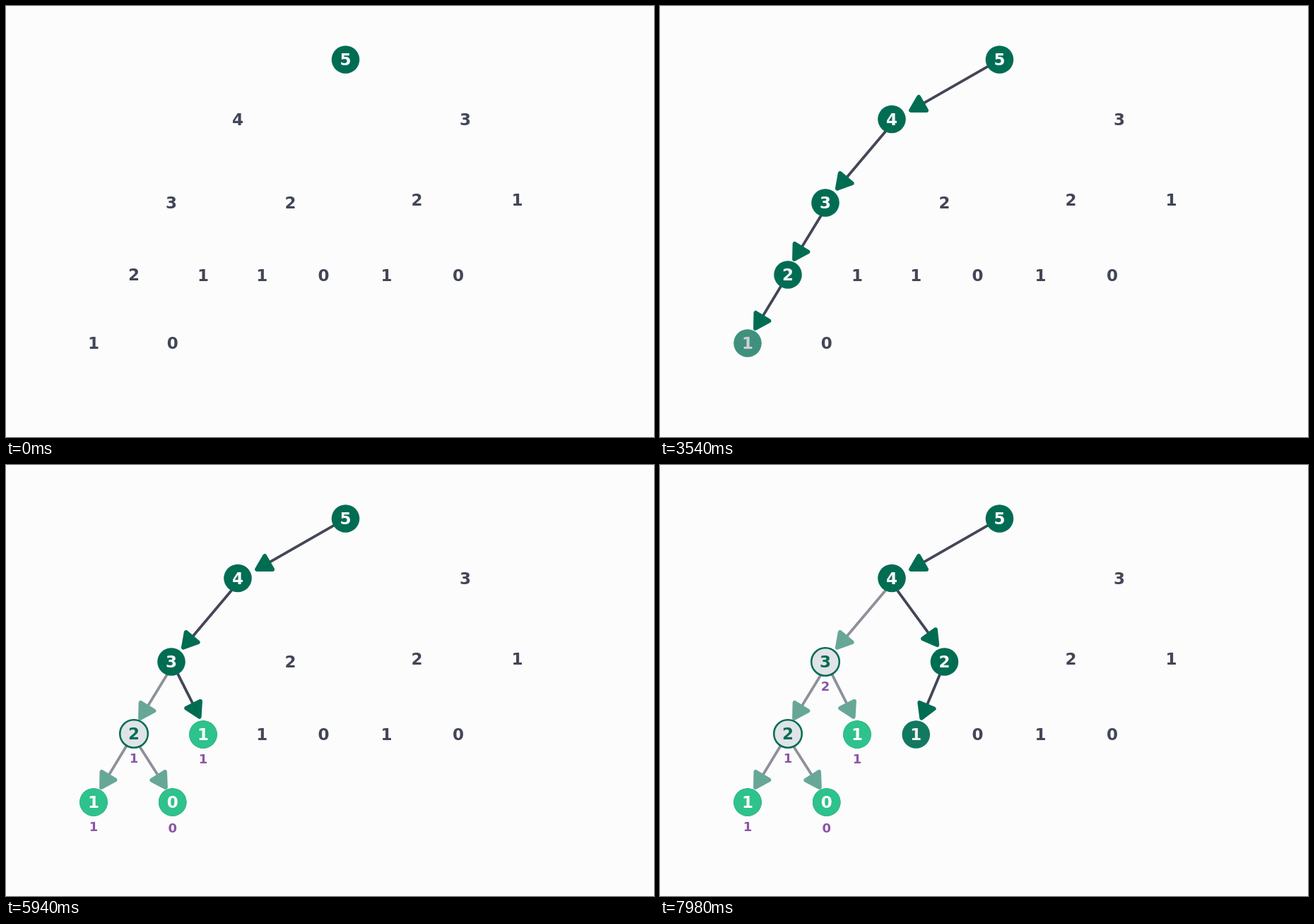
An HTML page for the animation above (8 s loop, 917 by 611 pixels).

```html
<!DOCTYPE html>
<html lang="en">
<head>
<meta charset="utf-8">
<title>Recursion tree</title>
<style>
  html, body { margin: 0; width: 100%; height: 100%; overflow: hidden; background: #fcfcfc; }
  svg { display: block; width: 100%; height: 100%; }
  text { font: bold 23px "DejaVu Sans", sans-serif; text-anchor: middle; }
  .label { font-size: 18px; fill: #8a56a5; }
</style>
</head>
<body>
<svg id="stage" viewBox="0 0 917 611"></svg>
<script>
const LOOP = 8000, DARK = '#434656', GREEN = '#006d53', LIGHT = '#2ec28c', PALE = '#e0e3e8';
const stage = document.getElementById('stage');
const updates = [];

function add(tag, attrs, parent = stage, text = '') {
  const el = document.createElementNS('http://www.w3.org/2000/svg', tag);
  for (const key in attrs) el.setAttribute(key, attrs[key]);
  el.textContent = text;
  return parent.appendChild(el);
}

const ramp = (t, start, length) => Math.min(1, Math.max(0, (t - start) / length));

function fadeIn(el, start, length) {
  updates.push(t => el.setAttribute('opacity', ramp(t, start, length)));
}

function digit(value, x, y, fill, parent) {
  add('text', { x, y: y + 8.4, fill }, parent, value);
}

// Line grows from behind the parent node, then the head fades in; later both dim.
function edge(x1, y1, x2, y2, start, dim = Infinity) {
  const length = Math.hypot(x2 - x1, y2 - y1);
  const ux = (x2 - x1) / length, uy = (y2 - y1) / length;
  const sx = x1 - 16 * ux, sy = y1 - 16 * uy, reach = length - 7;
  const group = add('g', {});
  const line = add('line', { x1: sx, y1: sy, stroke: DARK, 'stroke-width': 3.8, 'stroke-linecap': 'round' }, group);
  const angle = Math.atan2(uy, ux) * 180 / Math.PI;
  const head = add('path', {
    d: 'M-3 0L-22 -11V11Z', transform: `translate(${x2} ${y2}) rotate(${angle})`,
    fill: GREEN, stroke: GREEN, 'stroke-width': 6, 'stroke-linejoin': 'round'
  }, group);
  fadeIn(head, start + 230, 190);
  updates.push(t => {
    const grown = ramp(t, start, 235) * reach;
    line.setAttribute('x2', sx + ux * grown);
    line.setAttribute('y2', sy + uy * grown);
    line.setAttribute('visibility', t > start ? 'visible' : 'hidden');
    group.setAttribute('opacity', 1 - 0.41 * ramp(t, dim, 140));
  });
}

function disc(value, x, y, fill, ink, start, length, ring) {
  const group = add('g', {});
  add('circle', { cx: x, cy: y, r: 19.8, fill, stroke: ring ? GREEN : 'none', 'stroke-width': 2.5 }, group);
  digit(value, x, y, ink, group);
  fadeIn(group, start, length);
}

function node(value, x, y, start) {
  digit(value, x, y, DARK);
  if (start !== undefined) disc(value, x, y, GREEN, '#fff', start, 220);
}

function result(value, x, y, answer, labelY, start, isLeaf) {
  if (isLeaf) disc(value, x, y, LIGHT, '#fff', start, 120);
  else disc(value, x, y, PALE, GREEN, start, 140, true);
  const label = add('text', { class: 'label', x, y: labelY + 6.5 }, stage, answer);
  fadeIn(label, start, isLeaf ? 120 : 140);
}

edge(465, 85, 352.5, 149.5, 450);
edge(319, 178, 249, 261, 1250, 6260);
edge(228, 297, 188.5, 361.5, 2110, 5040);
edge(171, 397.5, 133.5, 459.5, 2957, 3765);
edge(189, 399, 227.5, 459.5, 3917, 4720);
edge(243, 296, 275, 359.5, 5180, 5960);
edge(336, 178, 394, 257.5, 6520);
edge(396, 297, 369, 361.5, 7358);

node(5, 480.5, 76, -300);
node(4, 328, 160.5, 870);
node(3, 650, 160.5);
node(3, 234, 279, 1670);
node(2, 402.5, 279, 6940);
node(2, 581.5, 274.5);
node(1, 723.5, 274.5);
node(2, 181, 381, 2530);
node(1, 279, 382, 5600);
node(1, 362.3, 382, 7778);
node(0, 449.5, 382);
node(1, 538.5, 382);
node(0, 640, 382);
node(1, 124, 478, 3377);
node(0, 235.7, 478, 4337);

result(1, 124, 478, 1, 512.5, 3600, true);
result(0, 235.7, 478, 0, 514, 4560, true);
result(2, 181, 381, 1, 415.5, 4880);
result(1, 279, 382, 1, 416.5, 5820, true);
result(3, 234, 279, 2, 313, 6110);

const begin = performance.now();
function frame() {
  const t = (performance.now() - begin) % LOOP;
  for (const update of updates) update(t);
  requestAnimationFrame(frame);
}
frame();
</script>
</body>
</html>
```
